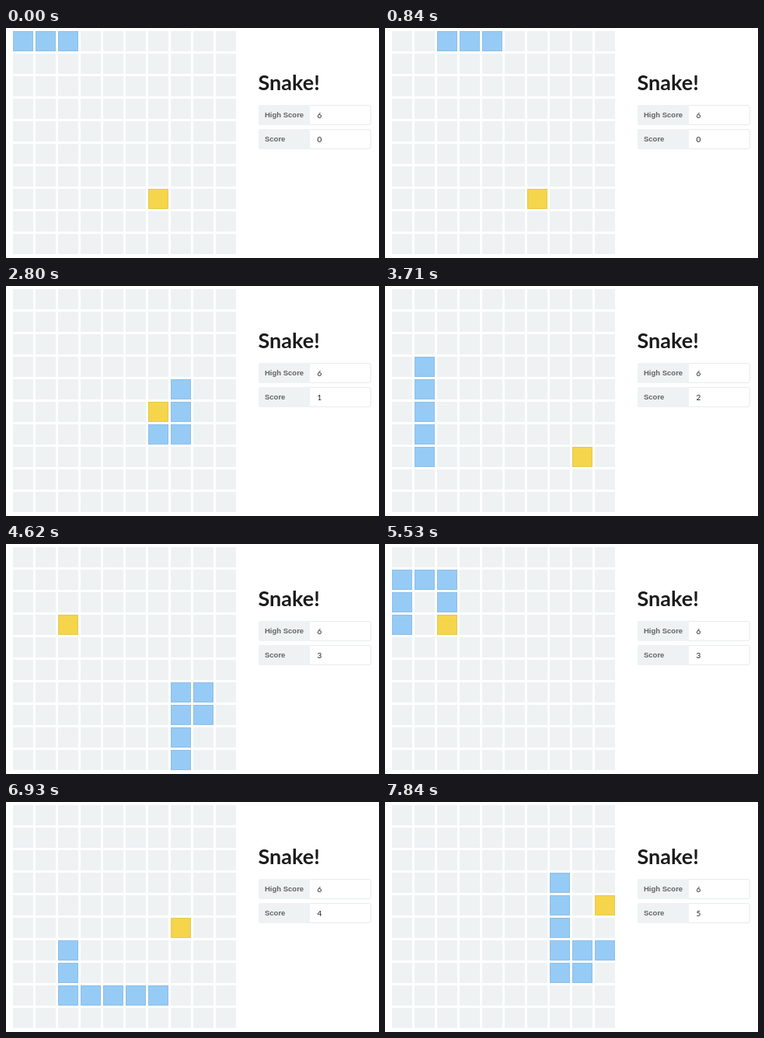
An HTML page with a canvas for the animation above (7.91 s loop, 480 by 296 pixels).

```html
<!DOCTYPE html>
<html lang="en">
<head>
<meta charset="utf-8">
<title>Snake!</title>
<style>
  html, body { margin: 0; width: 100%; height: 100%; overflow: hidden; background: #fff; }
  canvas { display: block; }
</style>
</head>
<body>
<canvas id="stage" width="480" height="296"></canvas>
<script>
const ctx = document.getElementById('stage').getContext('2d');
const TICK = 70, TICKS = 113, SIZE = 10;
const PITCH = 29, CELL = 26, LEFT = 9, TOP = 4;
const EMPTY = '#eef2f3', BODY = '#96cbf5', FOOD = '#f5d54b';

const DIRS = { R: [1, 0], L: [-1, 0], U: [0, -1], D: [0, 1] };
const ROUTE = 'R13 D3 L3 D5 R4 U2 L2 D1 R2 U1 R1 U2 L1 D1 L1 U2 L4 D4 R1 D2 R5 ' +
  'U3 R1 D2 R1 U5 R1 U2 R2 D7 R3 U2 L3 D2 R4 U5 R1 D4 R1 U1 R1';
const FOODS = [[6, 7], [6, 5], [8, 7], [2, 3], [7, 5], [9, 4]];

const same = (a, b) => a[0] === b[0] && a[1] === b[1];
const wrap = n => (n + SIZE) % SIZE;

// Play the route once and keep the state after every move.
function play() {
  let snake = [[2, 0], [1, 0], [0, 0]], score = 0;
  const states = [{ snake, score }];
  for (const run of ROUTE.split(' ')) {
    const [dx, dy] = DIRS[run[0]];
    for (let i = +run.slice(1); i > 0; i--) {
      const head = [wrap(snake[0][0] + dx), wrap(snake[0][1] + dy)];
      const ate = same(head, FOODS[score]);
      snake = [head, ...(ate ? snake : snake.slice(0, -1))];
      if (ate) score++;
      states.push({ snake, score });
    }
  }
  return states;
}
const states = play();

// The game pauses for one tick three times; the last two are caught up.
function moveAt(tick) {
  if (tick === 34 || tick === 96) tick--;
  return tick < 13 ? tick : tick - 1;
}

function cell([x, y], color, edge) {
  const px = LEFT + x * PITCH, py = TOP + y * PITCH;
  ctx.fillStyle = color;
  ctx.fillRect(px, py, CELL, CELL);
  if (!edge) return;
  ctx.strokeStyle = edge;
  ctx.lineWidth = 1;
  ctx.strokeRect(px + 0.5, py + 0.5, CELL - 1, CELL - 1);
}

function text(str, x, y, font, color) {
  ctx.font = font;
  ctx.fillStyle = color;
  ctx.fillText(str, x, y);
}

function field(label, value, y) {
  ctx.beginPath();
  ctx.roundRect(325.5, y + 0.5, 144, 25, 2.5);
  ctx.strokeStyle = '#e9ebec';
  ctx.lineWidth = 1;
  ctx.stroke();
  ctx.beginPath();
  ctx.roundRect(325, y, 66, 26, [3, 0, 0, 3]);
  ctx.fillStyle = EMPTY;
  ctx.fill();
  text(label, 333, y + 15.5, 'bold 9.5px "Liberation Sans", Arial, sans-serif', '#626364');
  text(value, 400.5, y + 17, '10px Lato, sans-serif', '#222');
}

function draw(tick) {
  const { snake, score } = states[moveAt(tick)];
  ctx.fillStyle = '#fff';
  ctx.fillRect(0, 0, 480, 296);
  for (let i = 0; i < SIZE * SIZE; i++) cell([i % SIZE, Math.floor(i / SIZE)], EMPTY);
  cell(FOODS[score], FOOD, '#e6c94d');
  for (const part of snake) cell(part, BODY, '#8cbfe8');
  text('Snake!', 324.5, 80, 'bold 27px Lato, sans-serif', '#1c1c1d');
  field('High Score', '6', 99);
  field('Score', String(score), 130);
}

function frame(now) {
  draw(Math.floor(now / TICK) % TICKS);
  requestAnimationFrame(frame);
}
draw(0);
requestAnimationFrame(frame);
</script>
</body>
</html>
```
